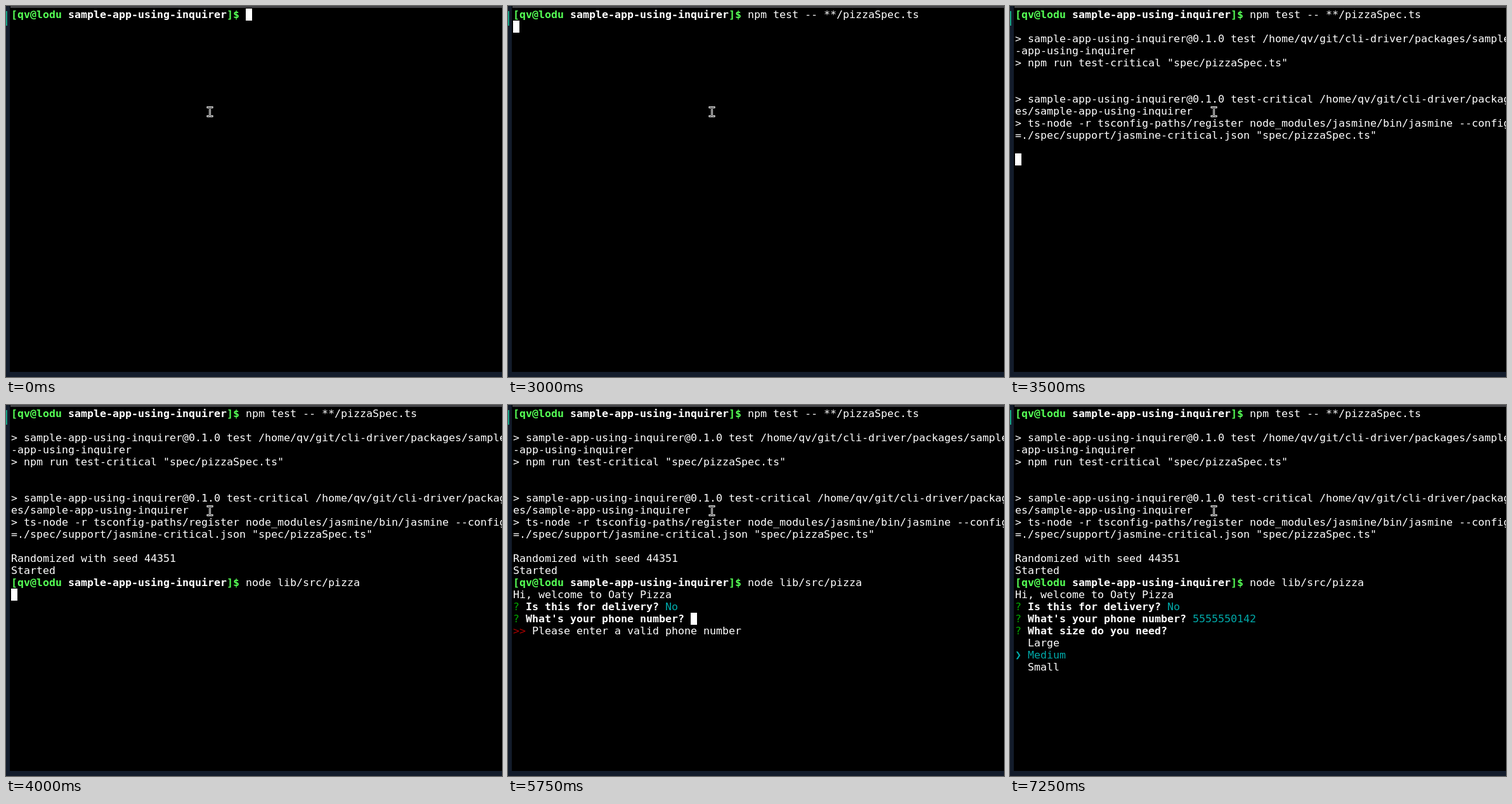
Write an HTML page with a canvas that moves like this. It is 782x584 px and loops after 8 s.

```html
<!DOCTYPE html>
<html lang="en">
<head>
<meta charset="utf-8">
<title>Terminal session</title>
<style>
  html, body { margin: 0; width: 100%; height: 100%; overflow: hidden; background: #000; }
  canvas { display: block; }
</style>
</head>
<body>
<canvas id="stage" width="782" height="584"></canvas>
<script>
const ctx = document.getElementById('stage').getContext('2d');
const LOOP = 8000, LEFT = 8, TOP = 4, CELL = 10, ROW = 19, ASCENT = 15;
const FONT = '16.61px "DejaVu Sans Mono", monospace';

const WHITE = '#fff', DIM = '#aaa', LIME = '#5f5', GREEN = '#0a0', CYAN = '#0aa', RED = '#a00';

// A piece of text: [text, colour, bold]
const plain = s => [s, WHITE];
const bold = (s, colour = WHITE) => [s, colour, true];
const cyan = s => [s, CYAN];
const dim = s => [s, DIM];
const prompt = cmd => [
  bold('[qv@lodu ', LIME), bold('sample-app-using-inquirer'), bold(']$ ', LIME), plain(cmd)
];
const ask = (question, ...rest) => [['? ', GREEN], bold(question + ' '), ...rest];

// [time, row, pieces]: a later entry replaces the same row
const output = [
  [0, 0, prompt('')],
  [500, 0, prompt('npm t')],
  [1750, 0, prompt('npm test -- **/pizzaSpec.ts')],
  [3250, 2, [plain('> sample-app-using-inquirer@0.1.0 test /home/qv/git/cli-driver/packages/sample')]],
  [3250, 3, [plain('-app-using-inquirer')]],
  [3250, 4, [plain('> npm run test-critical "spec/pizzaSpec.ts"')]],
  [3500, 7, [plain('> sample-app-using-inquirer@0.1.0 test-critical /home/qv/git/cli-driver/packag')]],
  [3500, 8, [plain('es/sample-app-using-inquirer')]],
  [3500, 9, [plain('> ts-node -r tsconfig-paths/register node_modules/jasmine/bin/jasmine --config')]],
  [3500, 10, [plain('=./spec/support/jasmine-critical.json "spec/pizzaSpec.ts"')]],
  [4000, 12, [plain('Randomized with seed 44351')]],
  [4000, 13, [plain('Started')]],
  [4000, 14, prompt('node lib/src/pizza')],
  [4500, 15, [plain('Hi, welcome to Oaty Pizza')]],
  [4500, 16, ask('Is this for delivery?', dim('(Y/n) '))],
  [5000, 16, ask('Is this for delivery?', cyan('No'))],
  [5000, 17, ask("What's your phone number?")],
  [5750, 18, [['>> ', RED], plain('Please enter a valid phone number')]],
  [6500, 17, ask("What's your phone number?", cyan('5555550142'))],
  [6500, 18, ask('What size do you need?', dim('(Use arrow keys)'))],
  [6500, 19, [cyan('❯ Large')]],
  [6500, 20, [plain('  Medium')]],
  [6500, 21, [plain('  Small')]],
  [7250, 18, ask('What size do you need?')],
  [7250, 19, [plain('  Large')]],
  [7250, 20, [cyan('❯ Medium')]]
];

// [time, column, row]; no column means hidden
const cursors = [
  [0, 37, 0], [500, 42, 0], [1750, 64, 0], [3000, 0, 1], [3250, 0, 6], [3500, 0, 12],
  [4000, 0, 15], [4500, 30, 16], [5000, 28, 17], [6500]
];

function box(colour, x, y, w, h) {
  ctx.fillStyle = colour;
  ctx.fillRect(x, y, w, h);
}

function drawWindow() {
  box('#000', 0, 0, 782, 584);
  box('#444448', 7, 0, 775, 3);
  box('#131c2b', 0, 0, 6, 584);
  box('#131c2b', 0, 576, 782, 8);
  box('#16a085', 0, 8, 2, 23);
}

function drawRow(row, pieces) {
  let x = LEFT;
  for (const [text, colour, heavy] of pieces) {
    ctx.font = (heavy ? 'bold ' : '') + FONT;
    ctx.fillStyle = colour;
    for (const ch of text) {
      ctx.fillText(ch, x, TOP + row * ROW + ASCENT);
      x += CELL;
    }
  }
}

const beam = new Path2D('M318 159.5h2.5l1 1 1-1h2.5M321.5 160v13M318 173.5h2.5l1-1 1 1h2.5');

function drawPointer() {
  ctx.lineCap = 'square';
  for (const [colour, width] of [[WHITE, 3], ['#000', 1]]) {
    ctx.strokeStyle = colour;
    ctx.lineWidth = width;
    ctx.stroke(beam);
  }
}

function draw(now) {
  const t = now % LOOP;
  drawWindow();

  const rows = new Map();
  for (const [time, row, pieces] of output) if (time <= t) rows.set(row, pieces);
  rows.forEach((pieces, row) => drawRow(row, pieces));

  const [, col, row] = cursors.filter(c => c[0] <= t).pop();
  if (col !== undefined) box(WHITE, LEFT + col * CELL, TOP + row * ROW, CELL, ROW);

  drawPointer();
}

let start;
function tick(now) {
  start ??= now;
  draw(Math.max(0, now - start));
  requestAnimationFrame(tick);
}
draw(0);
requestAnimationFrame(tick);
</script>
</body>
</html>
```
